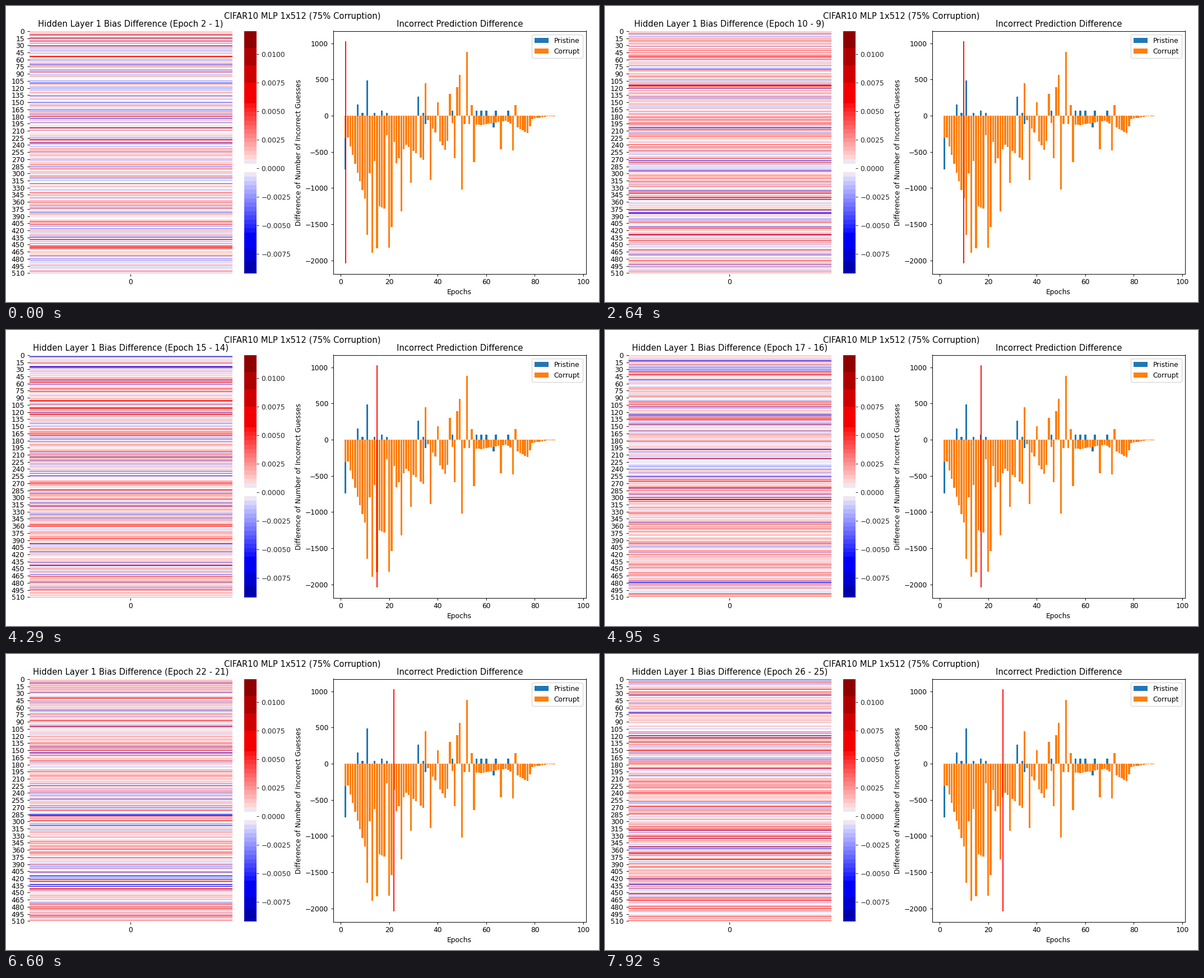
Animation of 1058x529 px, one loop 8000 ms. Source, as a matplotlib script:

```python
import numpy as np
import matplotlib.pyplot as plt
from matplotlib.animation import FuncAnimation
from matplotlib.colors import BoundaryNorm, ListedColormap

W, H = 1058, 529
DPI = W / 12
STEP_MS, TICK_MS, LOOP_MS = 330, 50, 8000
FIRST_EPOCH, LAST_EPOCH = 2, 26
UNITS = 512
VMIN, VMAX = -0.00922, 0.01205
HALF = VMAX / 2

plt.rcParams.update({"font.family": "DejaVu Sans", "font.size": 10})


def stepped_colours():
    """Diverging blue-white-red scale cut into flat steps around zero."""
    light = HALF * np.arange(1, 16) * 16 / 255
    reds = HALF + HALF * (255 - np.array([224, 192, 160])) / 127
    blues = HALF + HALF * (255 - np.array([224, 192])) / 178
    edges = np.concatenate(
        [[VMIN], -blues[::-1], -light[::-1], light, reds, [VMAX]])
    mids = (edges[:-1] + edges[1:]) / 2
    colours = plt.get_cmap("seismic")((mids / VMAX + 1) / 2)
    zero = int(np.argmin(abs(mids)))
    colours[zero] = 1
    for near in (zero - 1, zero + 1):
        colours[near, :3] = 0.94, 0.905, 0.95
    return ListedColormap(colours), BoundaryNorm(edges, len(colours))


def bias_change(epoch):
    rng = np.random.default_rng(100 + epoch)
    mean = 0.0002 if epoch == FIRST_EPOCH else 0.0008
    values = rng.laplace(mean, 0.0014, UNITS)
    return np.clip(values, VMIN * 0.99, VMAX * 0.99)[:, None]


def corrupt_change(epochs):
    """A trend that grows, shrinks and dies out, broken by outlying epochs."""
    knots = {2: -310, 3: -305, 10: -1145, 18: -1285, 23: -655, 27: -400,
             34: -610, 36: -60, 43: -470, 46: -100, 58: -130, 68: -70,
             77: -240, 79: -50, 85: -5, 96: -3}
    outliers = {11: -1645, 12: -795, 13: -1895, 14: -625, 15: -1835,
                19: -270, 20: -1820, 21: -1535, 22: -360, 25: -1320,
                29: -930, 32: 0, 35: 445, 37: -890, 40: 185, 45: 300,
                47: -590, 48: 390, 49: 565, 50: -1020, 52: 880, 54: 145,
                55: -645, 66: -465, 71: -480, 72: 145}
    trend = np.interp(epochs, list(knots), list(knots.values()))
    return [outliers.get(e, v) for e, v in zip(epochs, trend)]


def pristine_change():
    small = dict.fromkeys((9, 14, 19, 34), 38)
    medium = dict.fromkeys((17, 46, 56, 58, 60, 64, 69), 70)
    return small | medium | {2: -740, 7: 155, 11: 485, 32: 260,
                             35: -115, 63: -160, 74: -45}


def add_axes(left, right, top=44.5, bottom=478.5):
    return fig.add_axes(
        [left / W, 1 - bottom / H, (right - left) / W, (bottom - top) / H])


def hide_frame(ax):
    for spine in ax.spines.values():
        spine.set_visible(False)


fig = plt.figure(figsize=(12, 6), dpi=DPI, facecolor="white")
fig.suptitle("CIFAR10 MLP 1x512 (75% Corruption)")
cmap, norm = stepped_colours()
style = dict(cmap=cmap, norm=norm, aspect="auto", interpolation="nearest")
changes = {e: bias_change(e) for e in range(FIRST_EPOCH, LAST_EPOCH + 1)}

# Bias heatmap
heat_ax = add_axes(41.5, 403)
heat = heat_ax.imshow(changes[FIRST_EPOCH], extent=(0, 1, UNITS, 0), **style)
rows = np.arange(0, UNITS, 15)
heat_ax.set_yticks(rows + 0.5, [str(r) for r in rows])
heat_ax.set_xticks([0.5], ["0"])
hide_frame(heat_ax)
title = heat_ax.set_title("")

# Colour scale
bar_ax = add_axes(425, 447)
bar_ax.imshow(np.linspace(VMAX, VMIN, 868)[:, None],
              extent=(0, 1, VMIN, VMAX), **style)
marks = np.arange(-3, 5) * 0.0025
bar_ax.set_yticks(marks, [f"{m:.4f}".replace("-", "\u2212") for m in marks])
bar_ax.set_xticks([])
bar_ax.yaxis.tick_right()
bar_ax.tick_params(color="0.15", labelcolor="0.15")
hide_frame(bar_ax)

# Prediction bars
pred_ax = add_axes(583.5, 1035)
epochs = range(2, 97)
pristine = pristine_change()
pred_ax.bar(list(pristine), list(pristine.values()), color="tab:blue",
            label="Pristine")
pred_ax.bar(epochs, corrupt_change(epochs), color="tab:orange",
            label="Corrupt")
marker, = pred_ax.plot([2, 2], [-2032, 1018], color="red", lw=1.5)
pred_ax.set(xlim=(-3.14, 101.14), ylim=(-2183, 1170), xlabel="Epochs",
            ylabel="Difference of Number of Incorrect Guesses",
            title="Incorrect Prediction Difference")
pred_ax.legend(loc="upper right")


def update(frame):
    last_ms = (frame + 1) * TICK_MS - 1
    epoch = min(FIRST_EPOCH + last_ms // STEP_MS, LAST_EPOCH)
    heat.set_data(changes[epoch])
    title.set_text(f"Hidden Layer 1 Bias Difference (Epoch {epoch} - {epoch - 1})")
    marker.set_xdata([epoch, epoch])
    return heat, title, marker


anim = FuncAnimation(fig, update, frames=LOOP_MS // TICK_MS, interval=TICK_MS,
                     repeat=True, repeat_delay=0, blit=False)
plt.show()
```
